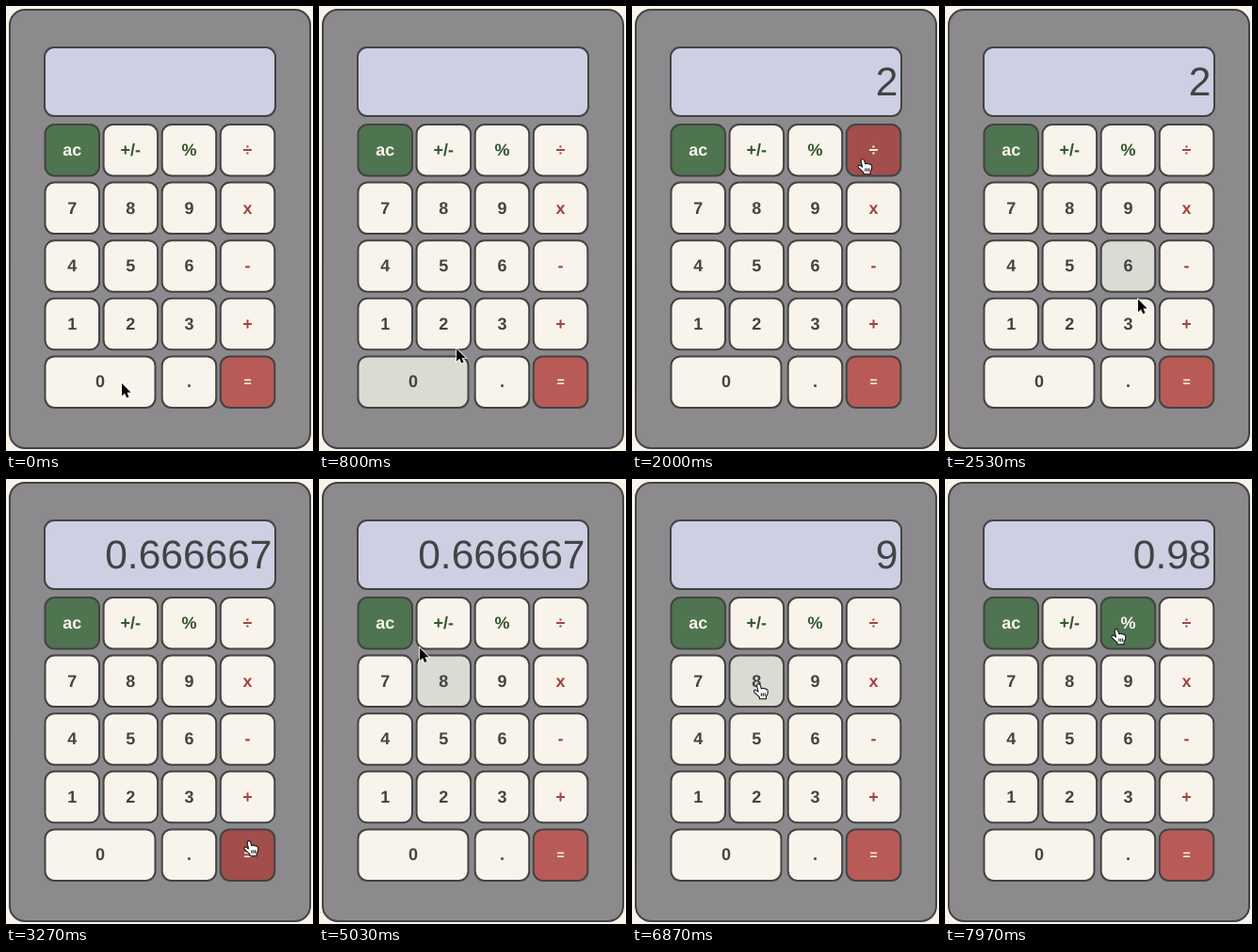
An HTML page that plays this animation: 326x473 px, repeating every 8 s.

```html
<!DOCTYPE html>
<html lang="en">
<head>
<meta charset="utf-8">
<title>Calculator</title>
<style>
  html, body { margin: 0; width: 100%; height: 100%; overflow: hidden; background: #f8f4eb; }
  svg { display: block; width: 326px; height: 473px; }
  rect { stroke: #434343; stroke-width: 2; }
  text { font: bold 18px "Liberation Sans", Arial, sans-serif; text-anchor: middle; text-rendering: geometricPrecision; }
  #display { font-weight: normal; font-size: 42.5px; text-anchor: end; fill: #434343; }
  .num rect, .fn rect, .op rect { fill: #f8f4eb; }
  .num text { fill: #434343; }
  .fn text { fill: #34562f; }
  .op text { fill: #a14341; }
  .ac rect { fill: #4f7450; }
  .eq rect { fill: #b85b56; }
  .ac text, .eq text { fill: #f8f4eb; }
  .eq text { font-size: 14px; }
  .num.hover rect { fill: #dadbd2; }
  .fn.hover rect { fill: #4f7450; }
  .ac.hover rect { fill: #3d5f3c; }
  .op.hover rect, .eq.hover rect { fill: #a14e4c; }
  .fn.hover text, .op.hover text { fill: #f8f4eb; }
</style>
</head>
<body>
<svg viewBox="0 0 326 473">
  <rect x="4" y="4" width="319" height="466" rx="16" fill="#8c8a8c"/>
  <rect x="41" y="44" width="245" height="73" rx="10" fill="#cecfe2"/>
  <text id="display" x="282.5" y="95"></text>
  <g id="keys"></g>
  <g id="cursor">
    <path id="arrow" d="M0 0V13.5L3.1 10.7 5.2 15.4 7.5 14.4 5.5 9.8H9.6Z" stroke="#fff" stroke-width="1.6" paint-order="stroke"/>
    <g id="hand" stroke="#111" stroke-width="1.1" stroke-linejoin="round" transform="scale(.95)">
      <path fill="#fff" d="M-2 1.5C-2-1 1.3-1 1.8 1.5L3 5.2C4 4 5.5 4.2 6 5.2 7 4.6 8.2 5 8.5 6 9.6 5.5 10.3 6.5 10.3 8L10 11 8.5 13.5V16.5H1V14.5L-4.5 9.5C-6.5 7.3-4.5 5.5-2.8 7L-.5 8.5Z"/>
      <path fill="none" d="M3 10V13.5M5 10V13.5M7 10V13.5"/>
    </g>
  </g>
</svg>
<script>
const LOOP = 8000, PRESS_DELAY = 130;
const $ = id => document.getElementById(id);

const rows = [['ac', '+/-', '%', '÷'], ['7', '8', '9', 'x'], ['4', '5', '6', '-'],
  ['1', '2', '3', '+'], ['0', null, '.', '=']];
const kinds = { 'ac': 'ac', '=': 'eq', '+/-': 'fn', '%': 'fn', '÷': 'op', 'x': 'op', '-': 'op', '+': 'op' };

function svg(tag, attrs, parent) {
  const el = document.createElementNS('http://www.w3.org/2000/svg', tag);
  for (const name in attrs) el.setAttribute(name, attrs[name]);
  return parent.appendChild(el);
}

const keys = [];
rows.forEach((row, r) => row.forEach((label, c) => {
  if (label === null) return;
  const x = 41.5 + c * 62.1, y = 126 + r * 61.6;
  const width = label === '0' ? 117 : 57.5, height = 54.5;
  const el = svg('g', { class: kinds[label] || 'num' }, $('keys'));
  svg('rect', { x, y, width, height, rx: 10 }, el);
  svg('text', { x: x + width / 2, y: y + (label === '=' ? 31.5 : 33) }, el).textContent = label;
  keys.push({ el, label, x, y, width, height });
}));

// Pointer trips, each easing out: depart, arrive, x, y, press on arrival
const home = [123, 401];
const trips = [
  [0, 500, 149, 386],
  [670, 1130, 143, 341, true],
  [1300, 2010, 245, 163, true],
  [2150, 2770, 198, 338, true],
  [2950, 3130, 258, 385, true],
  [3970, 4130, 260, 390],
  [4700, 5080, 104.3, 175.8],
  [5080, 5400, 72, 158, true],
  [5540, 5900, 166.5, 233],
  [5930, 6130, 190, 222, true],
  [6280, 6930, 134, 218, true],
  [7100, 7760, 182, 160, true]
];

function tip(t) {
  let [x, y] = home;
  for (const [depart, arrive, toX, toY] of trips) {
    if (t < depart) break;
    const u = Math.min(1, (t - depart) / (arrive - depart));
    const s = u * (2 - u);
    x += (toX - x) * s;
    y += (toY - y) * s;
  }
  return [x, y];
}

function keyAt(t) {
  if (t < 0) return;
  const [x, y] = tip(t);
  return keys.find(k => x >= k.x - 1 && x <= k.x + k.width + 1
    && y >= k.y - 1 && y <= k.y + k.height + 1);
}

const cleared = { shown: '', fresh: true };

function press(state, label) {
  const { shown, fresh, left } = state;
  switch (label) {
    case 'ac': return cleared;
    case '÷': return { shown, fresh: true, left: shown };
    case '=': return { shown: String(+(left / shown).toFixed(6)), fresh: true };
    case '%': return { shown: String(shown / 100), fresh: true };
    default: return { ...state, shown: fresh ? label : shown + label, fresh: false };
  }
}

const presses = trips.filter(trip => trip[4]).map(([, arrive]) =>
  ({ time: arrive + PRESS_DELAY, label: keyAt(arrive).label }));

function reading(t) {
  return presses.filter(p => p.time <= t).reduce((s, p) => press(s, p.label), cleared).shown;
}

function draw(now) {
  const t = now % LOOP;
  // Pointer shape and highlight trail slightly behind the pointer
  const over = keyAt(t - 30), lit = keyAt(t - 60);
  for (const k of keys) k.el.classList.toggle('hover', k === lit);
  $('arrow').style.display = over ? 'none' : '';
  $('hand').style.display = over ? '' : 'none';
  $('cursor').setAttribute('transform', `translate(${tip(t)})`);
  $('display').textContent = reading(t);
}

let start;
function frame(now) {
  start ??= now;
  draw(now - start);
  requestAnimationFrame(frame);
}
draw(0);
requestAnimationFrame(frame);
</script>
</body>
</html>
```
